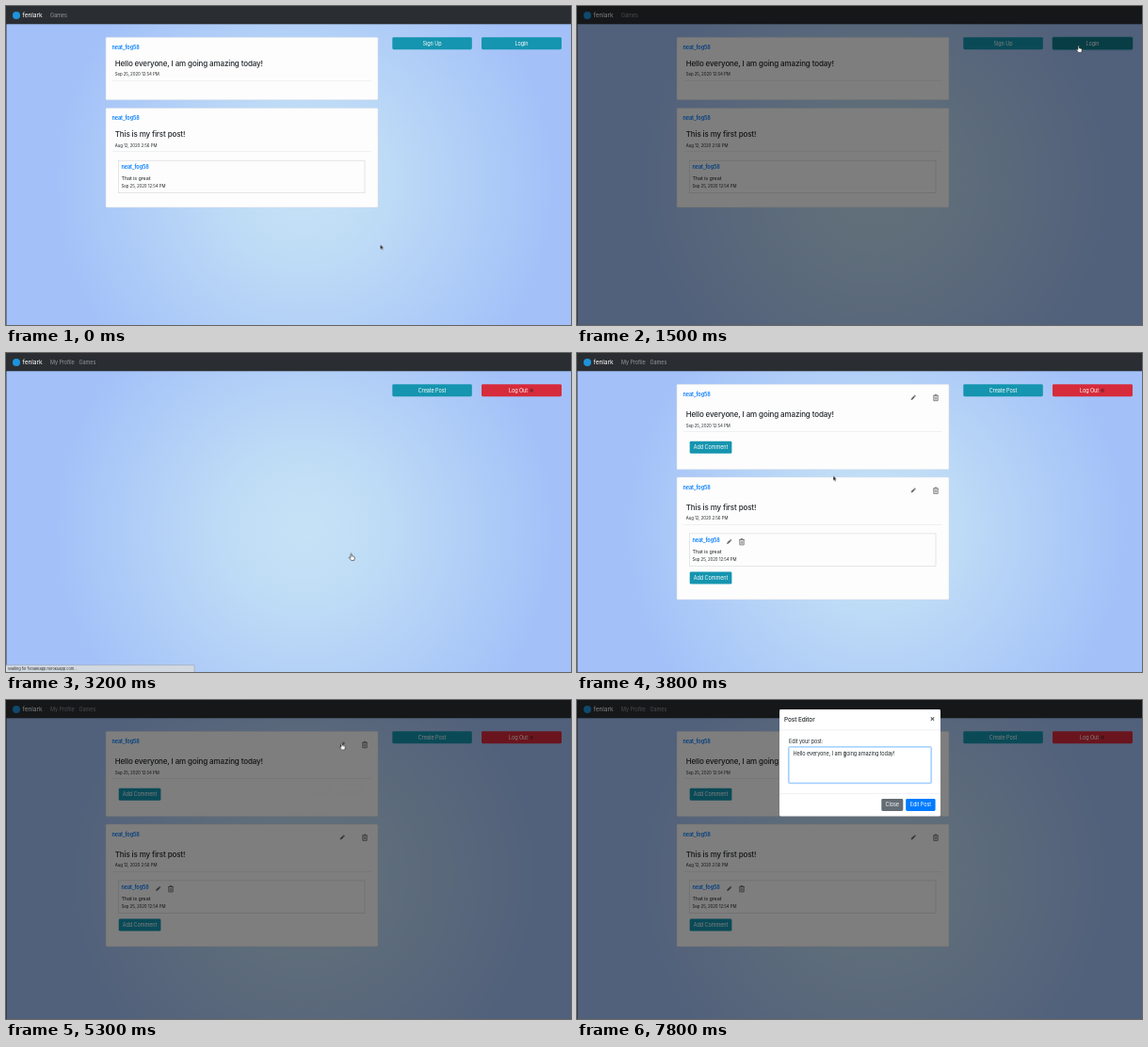
Recreate the animation shown at these times as an HTML page. Size 600x339 px, loop 8000 ms.

```html
<!DOCTYPE html>
<html lang="en">
<head>
<meta charset="utf-8">
<title>fenlark</title>
<style>
html, body { margin: 0; width: 100%; height: 100%; overflow: hidden; background: #a3c1f8; }
svg { display: block; width: 100vw; height: 100vh; }
text { font-family: Inter, "Liberation Sans", sans-serif; letter-spacing: -.015em; white-space: pre; }

/* One loop is 8 s, so 1% is 80 ms. */
.guest, .member, .posts, .status, .press, .caret, .arrow, .hand, .beam { animation: 8s step-end infinite; }
.guest { animation-name: guest; }
.member { animation-name: member; }
.posts { animation-name: posts; }
.status { animation-name: status; }
.press { animation-name: press; }
.caret { animation-name: caret; }
.arrow { animation-name: arrow; }
.hand { animation-name: hand; }
.beam { animation-name: beam; }
.shade { animation: shade 8s linear infinite; }
.login { animation: login 8s ease-out infinite; }
.editor { animation: editor 8s ease-out infinite; }
.pointer { animation: pointer 8s ease-in-out infinite; }

@keyframes guest { 0% { opacity: 1 } 38.75%, 100% { opacity: 0 } }
@keyframes member { 0% { opacity: 0 } 38.75%, 100% { opacity: 1 } }
@keyframes posts { 0% { opacity: 0 } 45%, 100% { opacity: 1 } }
@keyframes status { 0% { opacity: 0 } 38.75% { opacity: 1 } 45%, 100% { opacity: 0 } }
@keyframes press { 0% { opacity: 0 } 11% { opacity: 1 } 24%, 100% { opacity: 0 } }
@keyframes caret { 0% { opacity: 0 } 69% { opacity: 1 } 76%, 100% { opacity: 0 } }
@keyframes arrow {
  0% { opacity: 1 } 10.5% { opacity: 0 } 24% { opacity: 1 } 34% { opacity: 0 }
  41% { opacity: 1 } 55.5% { opacity: 0 } 67.5% { opacity: 1 } 70%, 100% { opacity: 0 }
}
@keyframes hand {
  0% { opacity: 0 } 10.5% { opacity: 1 } 24% { opacity: 0 } 34% { opacity: 1 }
  41% { opacity: 0 } 55.5% { opacity: 1 } 67.5%, 100% { opacity: 0 }
}
@keyframes beam { 0% { opacity: 0 } 70%, 100% { opacity: 1 } }
@keyframes shade {
  0%, 16.25% { opacity: 0 } 18.1%, 38.74% { opacity: .5 }
  38.75%, 64.4% { opacity: 0 } 66.25%, 100% { opacity: .5 }
}
@keyframes login {
  0%, 18.9% { opacity: 0; transform: translateY(-17px) }
  22.5%, 38.74% { opacity: 1; transform: none }
  38.75%, 100% { opacity: 0; transform: none }
}
@keyframes editor {
  0%, 66.25% { opacity: 0; transform: translateY(-17px) }
  70%, 100% { opacity: 1; transform: none }
}
@keyframes pointer {
  0%, .6% { transform: translate(397.5px, 253.5px) }
  11.25%, 22.5% { transform: translate(532px, 42px) }
  26.25%, 27.5% { transform: translate(345px, 242px) }
  28.75% { transform: translate(339px, 206px) }
  36.25%, 41% { transform: translate(366px, 213px) }
  48.75%, 51.25% { transform: translate(267px, 126px) }
  55%, 56.25% { transform: translate(352px, 53px) }
  57.5%, 67.5% { transform: translate(356px, 45.5px) }
  72.5% { transform: translate(285px, 85.5px) }
  78.75%, 85% { transform: translate(333px, 57.5px) }
  91.25%, 100% { transform: translate(284.5px, 58px) }
}
</style>
</head>
<body>
<svg id="stage" viewBox="0 0 600 339" preserveAspectRatio="none"></svg>
<script>
const USER = 'neat_fog58';
const GREETING = 'Hello everyone, I am going amazing today!';
const TEAL = '#1595af', RED = '#d62b3b', BLUE = '#007bff', GRAY = '#646c74';

const rect = (x, y, w, h, fill, extra = '') =>
  `<rect x="${x}" y="${y}" width="${w}" height="${h}" fill="${fill}" ${extra}/>`;

// y is the vertical middle of the capitals
const text = (x, y, str, { size = 5.5, fill = '#212529', weight = 400, anchor = 'start' } = {}) =>
  `<text x="${x}" y="${y + size * .36}" font-size="${size}" fill="${fill}" font-weight="${weight}" text-anchor="${anchor}">${str}</text>`;

const group = (name, ...parts) => `<g class="${name}">${parts.join('')}</g>`;

const button = (x, y, w, label, fill) =>
  rect(x, y, w, 13, fill, 'rx="1.4"') + text(x + w / 2, y + 6.5, label, { fill: '#fff', anchor: 'middle' });

const rule = (x, y, w, color = '#dfe2e5') => rect(x, y, w, .5, color);

const pencil = (x, y) => `<g transform="translate(${x} ${y}) rotate(45)" fill="#666">
  <path d="M-.9-3.2h1.8v1h-1.8zM-.9-1.8h1.8v3.6L0 3.4-.9 1.8z"/></g>`;

const trash = (x, y) => `<path transform="translate(${x} ${y})" fill="none" stroke="#555" stroke-width=".7"
  d="M-2.9-2.2h5.8M-1-2.3v-.9h2v.9M-2.2-2v5.2h4.4v-5.2M-.8-.9v3M.8-.9v3"/>`;

const userName = (x, y) => text(x, y, USER, { fill: BLUE, weight: 600 });
const stamp = (x, y, str) => text(x, y, str, { size: 4.4 });

function comment(y, owned) {
  return rect(119.5, y, 261.5, 34.5, '#fdfdfd', 'stroke="#d4d7da" stroke-width=".6"')
    + userName(122.5, y + 7.3)
    + (owned ? pencil(161.5, y + 8.8) + trash(175, y + 8.8) : '')
    + text(122.5, y + 18.8, 'That is great', { size: 5.4 })
    + stamp(122.5, y + 27.5, 'Sep 25, 2020 12:54 PM');
}

function post(y, height, title, date, owned, hasComment) {
  const top = y + (owned ? 4.2 : 0);
  return rect(106, y, 289, height, '#fdfdfd', 'rx="1.2" stroke="#d5dbe4" stroke-width=".5"')
    + userName(112.5, y + 11)
    + (owned ? pencil(357, y + 14.2) + trash(381, y + 14.2) : '')
    + text(115.7, top + 27.5, title, { size: 8, weight: 500 })
    + stamp(115.7, top + 39.5, date)
    + rule(113, top + 45.8, 275)
    + (hasComment ? comment(top + 55.7, owned) : '')
    + (owned ? button(119.7, y + height - 30 + (hasComment ? .6 : 0), 44.7, 'Add Comment', TEAL) : '');
}

function posts(owned) {
  const [h1, y2, h2] = owned ? [90.5, 132, 130] : [66.5, 108.5, 105.5];
  return post(33.3, h1, GREETING, 'Sep 25, 2020 12:54 PM', owned, false)
    + post(y2, h2, 'This is my first post!', 'Aug 12, 2020 2:56 PM', owned, true);
}

const navLink = (x, label) => text(x, 9.8, label, { fill: '#96999c' });

const field = (y, h, fill, focused) =>
  (focused ? rect(224.6, y - .6, 151.8, h + 1.2, 'none', 'rx="1.8" stroke="#007bff" stroke-opacity=".3" stroke-width="1.4"') : '')
  + rect(225.2, y, 150.6, h, fill, `rx="1.3" stroke="${focused ? '#80bdff' : '#ced4da'}" stroke-width=".6"`);

const dialog = (y, h, title) =>
  rect(215, y, 171, h, '#fff', 'rx="1.4"')
  + text(220, y + 10.6, title, { size: 6.5, weight: 500 })
  + text(377.5, y + 10.2, '×', { size: 8, weight: 700, fill: '#555', anchor: 'middle' })
  + rule(215, y + 21.7, 171) + rule(215, y + h - 24.5, 171);

const passwordDots = Array.from({ length: 11 }, (_, i) =>
  `<circle cx="${231 + i * 2.4}" cy="188" r=".85" fill="#333"/>`).join('');

document.getElementById('stage').innerHTML = [
  `<defs><radialGradient id="sky" gradientUnits="userSpaceOnUse" cx="317" cy="187" r="265">
    <stop offset="0" stop-color="#c5e3f6"/><stop offset=".3" stop-color="#bfdcf6"/>
    <stop offset="1" stop-color="#a3c1f8"/></radialGradient></defs>`,
  rect(0, 0, 600, 339, 'url(#sky)'),
  rect(0, 19, .8, 320, '#5c6c88'),
  rect(0, 0, 600, 19.3, '#2a2e32'),
  '<circle cx="11" cy="10" r="4" fill="#1e94dc"/>',
  text(17.5, 9.6, 'fenlark', { size: 6.7, fill: '#fff' }),

  group('guest',
    navLink(47, 'Games'), posts(false),
    button(410.3, 33.2, 84.5, 'Sign Up', TEAL), button(505, 33.2, 85, 'Login', TEAL),
    group('press',
      rect(504.6, 32.8, 85.8, 13.8, 'none', 'rx="1.8" stroke="#3ab0c3" stroke-opacity=".5" stroke-width="1.2"'),
      button(505, 33.2, 85, 'Login', '#117a8b'))),

  group('member',
    navLink(47, 'My Profile'), navLink(77.5, 'Games'),
    button(410.3, 33.2, 84.5, 'Create Post', TEAL),
    rect(505, 33.2, 85, 13, RED, 'rx="1.4"'),
    text(534, 39.7, 'Log Out', { fill: '#fff' }),
    '<circle cx="558" cy="39.8" r="2" fill="#8c2631"/>',
    group('posts', posts(true))),

  rect(0, 0, 600, 339, '#000', 'class="shade"'),

  group('login',
    dialog(109.3, 120.5, 'Enter your login information'),
    text(225, 143.3, 'Username'), field(149.5, 13.2, '#e6effc', true), text(229.5, 156.2, USER),
    text(225, 175, 'Password'), field(181.2, 13, '#e6effc', false), passwordDots,
    button(332, 211.2, 23, 'Close', GRAY), button(358, 211.2, 22.7, 'Login', BLUE)),

  group('editor',
    dialog(10, 113.5, 'Post Editor'),
    text(225, 43.8, 'Edit your post:'), field(50.2, 37.8, '#fff', true),
    text(229.5, 57, GREETING, { size: 5.55 }),
    rect(229, 54, .5, 6, '#111', 'class="caret"'),
    button(323.3, 105, 23, 'Close', GRAY), button(349.2, 105, 31.4, 'Edit Post', BLUE)),

  group('status',
    rect(-1, 331.8, 201, 8, '#d3d9e0', 'stroke="#9aa4b2" stroke-width=".6"'),
    text(2, 335.6, 'Waiting for fenlarkapp.herokuapp.com...', { size: 4, fill: '#333' })),

  group('pointer',
    '<path class="arrow" d="M0 0v5.2l1.2-1.1.9 2 .9-.4-.9-1.9h1.6z" fill="#111" stroke="#fff" stroke-width=".35"/>',
    `<path class="hand" d="M0 .6q.6-.9 1.2 0v2.2l2.6.6q.7.3.5 1.2L3.7 7.4H.6L-1.7 4.6q-.1-.9.8-.7l.9.7z"
      fill="#fff" stroke="#222" stroke-width=".6"/>`,
    '<path class="beam" d="M-1-3q.9 0 1 .6q.1-.6 1-.6M0-2.4v4.8M-1 3q.9 0 1-.6q.1.6 1 .6" fill="none" stroke="#222" stroke-width=".6"/>')
].join('');
</script>
</body>
</html>
```
